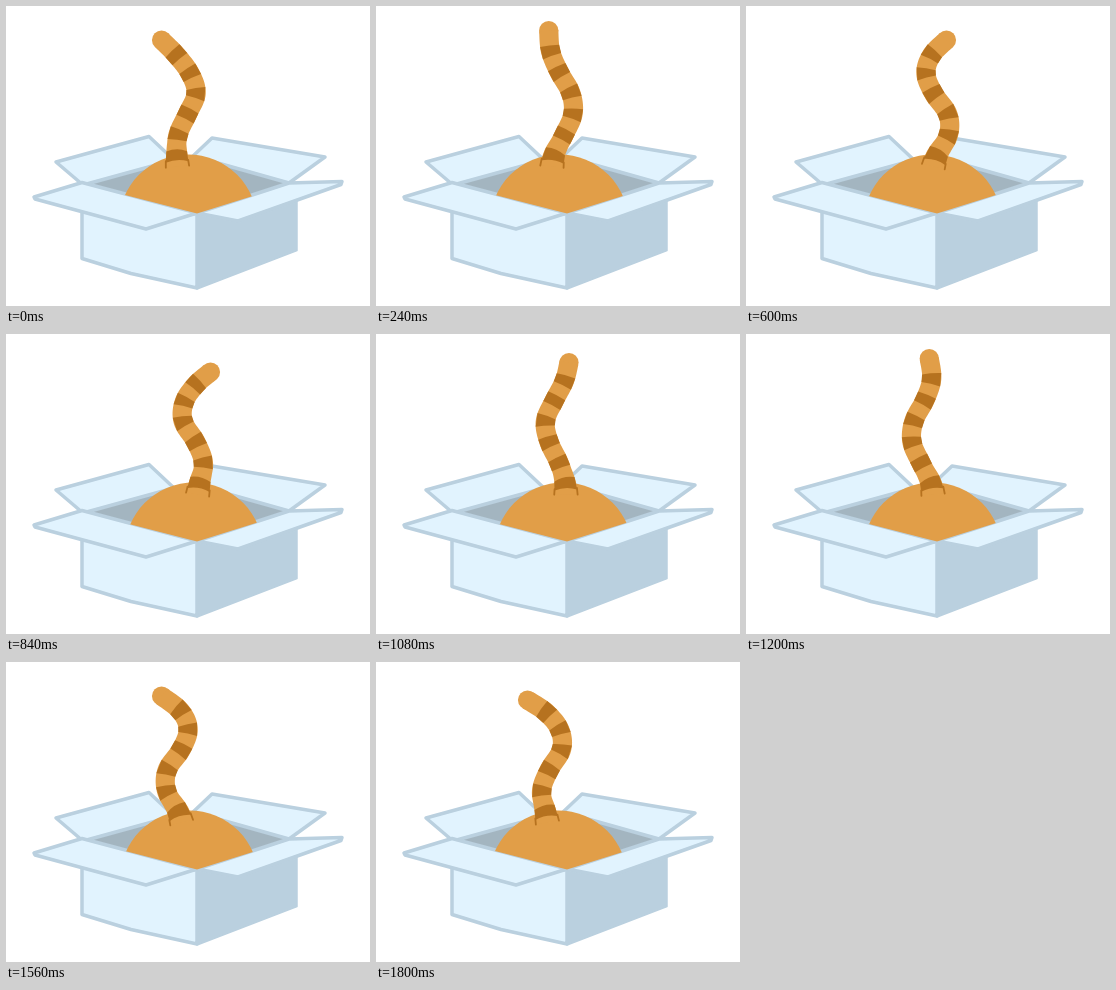
Animation, 364 px wide and 300 px high, one loop 1.92 s. Source, as an HTML page with a canvas:

```html
<!DOCTYPE html>
<html lang="en">
<head>
<meta charset="utf-8">
<title>Cat in a box</title>
<style>
  html, body { margin: 0; width: 100%; height: 100%; overflow: hidden; background: #fff; }
  canvas { display: block; }
</style>
</head>
<body>
<canvas id="stage" width="364" height="300"></canvas>
<script>
const ctx = document.getElementById('stage').getContext('2d');
const FUR = '#e19e48', STRIPE = '#b6721f';
const EDGE = '#bad0df', CARD = '#e1f3fe', INSIDE = '#a3b5c0';
const STEP = 120, STEPS = 16;

// Each tail joint, base to tip, swings sideways by sway and is furthest right at step peak
const sway = [9, 12, 21, 22, 13.5, 3, 10, 27];
const peak = [8, 6.8, 5.2, 4, 2.2, 0, 7.5, 6.5];
const TIP = sway.length - 1, ROOT = 0.55;

const swing = (step, top) => Math.cos(2 * Math.PI * (step - top) / STEPS);

// Joints are evenly stacked; the end of the tail droops as the tip swings out
function spineAt(step) {
  const droop = 0.02 * (sway[TIP] * swing(step, peak[TIP])) ** 2;
  return sway.map((amount, i) => {
    const reach = (i / TIP) ** 6;
    return [
      181.5 - 3.5 * reach + amount * swing(step, peak[i]),
      171 - 21 * i + droop * reach
    ];
  });
}

// Catmull-Rom curve through the joints
function spinePoint(spine, u) {
  const i = Math.min(Math.floor(u), TIP - 1), s = u - i;
  const at = j => spine[Math.max(0, Math.min(TIP, j))];
  return [0, 1].map(c => {
    const [p, a, b, q] = [-1, 0, 1, 2].map(k => at(i + k)[c]);
    return a + s / 2 * (b - p + s * (2 * p - 5 * a + 4 * b - q + s * (3 * (a - b) + q - p)));
  });
}

// Both sides of the tail at u, plus a middle point pushed towards the tip
function crossSection(spine, u, bulge = 0) {
  const [x, y] = spinePoint(spine, u);
  const [ax, ay] = spinePoint(spine, u - 0.04);
  const [bx, by] = spinePoint(spine, Math.min(TIP, u + 0.04));
  const len = Math.hypot(bx - ax, by - ay);
  const dx = (bx - ax) / len, dy = (by - ay) / len;
  const half = 9.6 + 2 * Math.max(0, 1.6 - u);
  return {
    left: [x + dy * half, y - dx * half],
    right: [x - dy * half, y + dx * half],
    mid: [x + dx * bulge, y + dy * bulge]
  };
}

function shape(points, fill, stroke, width = 3.5) {
  ctx.beginPath();
  points.forEach(p => ctx.lineTo(...p));
  if (fill) {
    ctx.closePath();
    ctx.fillStyle = fill;
    ctx.fill();
  }
  if (stroke) {
    ctx.strokeStyle = stroke;
    ctx.lineWidth = width;
    ctx.stroke();
  }
}

function disc(x, y, r) {
  ctx.beginPath();
  ctx.arc(x, y, r, 0, 2 * Math.PI);
  ctx.fillStyle = FUR;
  ctx.fill();
}

function band(spine, from, to, bulge) {
  const a = crossSection(spine, from, bulge), b = crossSection(spine, to, bulge);
  ctx.beginPath();
  ctx.moveTo(...a.left);
  ctx.quadraticCurveTo(...a.mid, ...a.right);
  ctx.lineTo(...b.right);
  ctx.quadraticCurveTo(...b.mid, ...b.left);
  ctx.fillStyle = STRIPE;
  ctx.fill();
}

function drawTail(spine) {
  const count = 80;
  const sections = Array.from({ length: count + 1 }, (_, i) =>
    crossSection(spine, ROOT + (TIP - ROOT) * i / count));
  disc(...spine[TIP], 9.6);
  shape([...sections.map(s => s.left), ...sections.map(s => s.right).reverse()], FUR);
  band(spine, 0.74, 1.22, 4);
  for (let i = 2; i < TIP; i++) band(spine, i - 0.24, i + 0.24, 1);
  for (const side of ['left', 'right']) {
    shape([ROOT, 0.8].map(u => crossSection(spine, u)[side]), null, STRIPE, 1.8);
  }
}

function drawBack() {
  shape([[77, 179], [186, 151], [283, 177], [191, 207]], INSIDE);
  shape([[50, 156], [143, 130.5], [168, 154], [77, 179]], CARD, EDGE);
  shape([[206, 132], [319, 151], [283, 177], [187, 150]], CARD, EDGE);
}

function drawFront() {
  shape([[191, 208], [291, 190], [291, 244.5], [191, 283]], EDGE, EDGE, 1.5);
  shape([[76, 200], [191, 208], [191, 282], [125, 267.5], [76, 252.5]], CARD, EDGE);
  shape([[28, 191], [76, 176.5], [191, 207], [140, 223], [29, 193]], CARD, EDGE);
  shape([[191, 207], [283, 177], [336, 175.5], [335, 178.5], [232, 215]], CARD, EDGE);
}

function drawBody(step) {
  ctx.save();
  ctx.beginPath();
  [[0, 0], [364, 0], [282, 179], [191, 207.5], [76, 178]].forEach(p => ctx.lineTo(...p));
  ctx.clip();
  disc(185 + 3 * swing(step, 7.5), 218, 69.5);
  ctx.restore();
}

function draw() {
  const step = Math.floor(performance.now() / STEP) % STEPS;
  ctx.clearRect(0, 0, 364, 300);
  ctx.lineJoin = ctx.lineCap = 'round';
  drawBack();
  drawFront();
  drawBody(step);
  drawTail(spineAt(step));
  requestAnimationFrame(draw);
}
draw();
</script>
</body>
</html>
```
